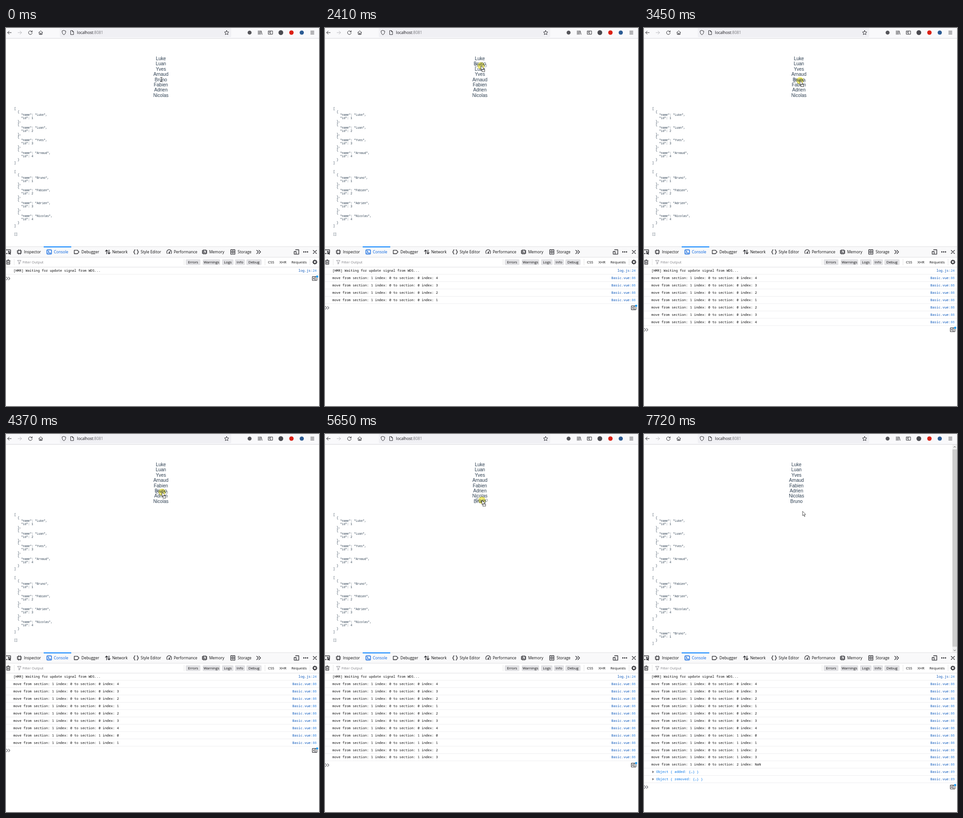
These frames come from a looping animation (681 px wide and 822 px high, 8000 ms). An HTML page:

```html
<!DOCTYPE html>
<html lang="en">
<head>
<meta charset="utf-8">
<title>Drag between lists</title>
<style>
  html, body { margin: 0; width: 100%; height: 100%; overflow: hidden; background: #fff; }
  svg { display: block; }
  text { white-space: pre; }
  .ui { font-family: "Open Sans", sans-serif; }
  .page { font: 10.1px "Liberation Sans", Arial, sans-serif; fill: #2c3e50; text-anchor: middle; }
  .json { font: 6.3px "Liberation Mono", monospace; fill: #2c3e50; }
  .log { font: 7.37px "Noto Sans Mono", monospace; fill: #0c0c0d; }
  .icon { fill: none; stroke-linecap: round; stroke-linejoin: round; }
  .halo { fill: #f8ef5c; opacity: .85; mix-blend-mode: multiply; }
</style>
</head>
<body>
<script>
const LOOP = 8000;
const INK = '#2e2e33', BLUE = '#0060df', LINE = '#e0e0e2';
const ROW = 15.93, ROW_Y = 527.6;
const NAME_Y = 66.6, NAME_STEP = 11.36;
const DRAGGED = 'Bruno';
const DROP = 7620;

function el(tag, attrs, parent, text) {
  const node = document.createElementNS('http://www.w3.org/2000/svg', tag);
  for (const key in attrs) node.setAttribute(key, attrs[key]);
  if (text !== undefined) node.textContent = text;
  if (parent) parent.append(node);
  return node;
}
const svg = el('svg', { width: 681, height: 822 }, document.body);
const group = (cls = '', parent = svg) => el('g', { class: cls }, parent);
const rect = (x, y, width, height, fill, parent = svg, rx = 0) =>
  el('rect', { x, y, width, height, fill, rx }, parent);
const label = (x, y, text, size, fill, parent = svg) =>
  el('text', { x, y, fill, 'font-size': size, class: 'ui' }, parent, text);
const icon = (x, y, d, stroke = INK, parent = svg, width = 1) =>
  el('path', { d, stroke, 'stroke-width': width, class: 'icon', transform: `translate(${x} ${y})` }, parent);
const dot = (cx, cy, r, fill, parent = svg) => el('circle', { cx, cy, r, fill }, parent);
const show = (node, on) => node.setAttribute('display', on ? 'inline' : 'none');
const place = (node, x, y) => node.setAttribute('transform', `translate(${x} ${y})`);

// Browser toolbar
function drawToolbar() {
  rect(0, 0, 681, 22, '#f9f9fb');
  rect(117, -3, 373, 23, '#f0f0f4', svg, 3);
  rect(0, 22, 681, 1, '#d8d8dc');
  icon(7.5, 10, 'M4 0H-4M-.5-3.5L-4 0L-.5 3.5');
  icon(30, 10, 'M-4 0H4M.5-3.5L4 0L.5 3.5', '#b8b8bd');
  icon(53, 10, 'M3.6-1.7A4 4 0 1 0 4 .8M4-4.2V-1.4H1.2');
  icon(75.5, 10, 'M-4.3 0L0-4L4.3 0M-3.2-.8V4H3.2V-.8M-1 4V1.2H1V4');
  icon(126, 10, 'M0-4.7L4-3.2C4 1 2.6 3.4 0 4.8C-2.6 3.4-4 1-4-3.2Z');
  icon(144, 10, 'M-3-4.3H.6L3-1.9V4.3H-3ZM.6-4.3V-1.9H3');
  icon(480, 10, 'M0-4.6L1.4-1.6L4.7-1.2L2.3 1.1L2.9 4.4L0 2.8L-2.9 4.4L-2.3 1.1L-4.7-1.2L-1.4-1.6Z');
  icon(553, 10, 'M-4-4V4M-1.6-4V4M.8-4V4M2.2-3.6L4.2 4');
  icon(575.5, 10, 'M-4.5-3.5H4.5V3.5H-4.5ZM-.3-3.5V3.5M-3-1.5H-1.8M-3 .3H-1.8');
  icon(666.5, 10, 'M-3.6-3H3.6M-3.6 0H3.6M-3.6 3H3.6');
  dot(530, 10, 4.3, '#55555a');
  dot(598, 10, 5.2, '#4a4a50');
  dot(621, 10, 4.8, '#dc1f14');
  dot(643.5, 10, 4.6, '#2b5b94');
  const url = label(154.5, 13, 'localhost', 8.45, '#15141a');
  el('tspan', { fill: '#77777d' }, url, ':8081');
}

// Developer tools panel
function drawTools() {
  rect(0, 475, 681, 347, '#fff');
  rect(0, 475, 681, 23, '#f9f9fa');
  for (const y of [475, 498, 519.5]) rect(0, y, 681, 1, LINE);
  rect(82, 475, 60, 2, '#0a84ff');

  const tabs = [
    [39, 'Inspector', 29, 'M-3.2-3.2H3.2V3.2H-3.2ZM-5-1.8H-3.2M-5 1.8H-3.2M3.2-1.8H5M3.2 1.8H5M-1.8-5V-3.2M1.8-5V-3.2M-1.8 3.2V5M1.8 3.2V5'],
    [104, 'Console', 94, 'M-4-4.5H4Q5-4.5 5-3.5V3.5Q5 4.5 4 4.5H-4Q-5 4.5-5 3.5V-3.5Q-5-4.5-4-4.5ZM-2.5-2L-.3 0L-2.5 2M.8 2.2H2.8'],
    [164, 'Debugger', 153.5, 'M-5-3.7H2L5.3 0L2 3.7H-5Z'],
    [231, 'Network', 221.5, 'M-2.6 4.3V-4M-5.2-1.5L-2.6-4.2L0-1.5M2.6-4.3V4M0 1.5L2.6 4.2L5.2 1.5'],
    [293, 'Style Editor', 283, 'M-2-4.5Q-3.8-4.5-3.8-2.8Q-3.8-.3-5.2 0Q-3.8.3-3.8 2.8Q-3.8 4.5-2 4.5M2-4.5Q3.8-4.5 3.8-2.8Q3.8-.3 5.2 0Q3.8.3 3.8 2.8Q3.8 4.5 2 4.5'],
    [365, 'Performance', 355, 'M-4 3.5A5.2 5.2 0 1 1 4 3.5M0 2.3L2.2-1.8M-1 2.3A1 1 0 1 0 1 2.3A1 1 0 1 0-1 2.3'],
    [442, 'Memory', 432, 'M-3.3-4H3.3V4H-3.3ZM-5.2-2.5H-3.5M-5.2 0H-3.5M-5.2 2.5H-3.5M3.5-2.5H5.2M3.5 0H5.2M3.5 2.5H5.2M-1-1.8V1.8H1'],
    [504, 'Storage', 493.5, 'M-4.5-4.8H4.5V4.8H-4.5ZM-4.5 0H4.5M-1.3-2.4H1.3M-1.3 2.4H1.3']
  ];
  for (const [x, name, ix, d] of tabs) {
    const on = name === 'Console';
    icon(ix, 487, d, on ? BLUE : INK, svg, 1.35);
    label(x, 490.4, name, 8.45, on ? BLUE : '#0c0c0d');
  }
  icon(5, 487, 'M-6-4.5H5V-1M-6 3.5H-2M0-1.5L5.5.6L3 1.8L5.2 4.2L4.2 5L2.2 2.7L1.2 4.5Z', INK, svg, 1.35);
  icon(549.5, 487, 'M-4-3.7L-.3 0L-4 3.7M.7-3.7L4.4 0L.7 3.7', INK, svg, 1.35);
  icon(632, 487, 'M-2-4.8H5V4.8H-.5M-5-1H-.7V4.8H-5Z', INK, svg, 1.35);
  for (const x of [648, 652, 656]) dot(x, 487, 1.4, INK);
  icon(672, 487, 'M-3.6-3.6L3.6 3.6M3.6-3.6L-3.6 3.6', INK, svg, 1.35);

  icon(5, 509, 'M-4.3-3H4.3M-1.5-3V-4.7H1.5V-3M-3.3-3V4.6H3.3V-3M-1.2-.8V2.5M1.2-.8V2.5', INK, svg, 1.2);
  icon(29, 509, 'M-3.7-3.7H3.7L1 .2V3.2L-1 4.3V.2Z', '#8a8a90', svg, .9);
  label(36, 512, 'Filter Output', 7.7, '#808086');
  for (const x of [17.5, 387, 563, 661]) rect(x, 502, .8, 14, LINE);

  const filters = [[391, 'Errors', 32], [428, 'Warnings', 38], [470, 'Logs', 25], [498, 'Info', 22],
    [523, 'Debug', 33], [569, 'CSS'], [594, 'XHR'], [620, 'Requests']];
  for (const [x, name, width] of filters) {
    if (width) rect(x, 503, width, 12.5, '#e2e2e5', svg, 2);
    const text = label(width ? x + width / 2 : x + 1, 512, name, 7.8, '#0c0c0d');
    if (width) text.setAttribute('text-anchor', 'middle');
  }
  for (let i = 0; i < 8; i++) {
    el('path', { d: 'M-1-5.3H1V-3H-1Z', fill: INK, transform: `translate(672 509) rotate(${i * 45})` }, svg);
  }
  icon(672, 509, 'M-3 0A3 3 0 1 0 3 0A3 3 0 1 0-3 0', INK, svg, 1.7);
}

// Page data
const people = names => names.map((name, i) => ({ name, id: i + 1 }));
const first = people(['Luke', 'Luan', 'Yves', 'Arnaud']);
const second = people([DRAGGED, 'Fabien', 'Adrien', 'Nicolas']);
const others = [...first, ...second.slice(1)].map(p => p.name);

function drawJson(lists) {
  const g = group('json');
  let y = 177;
  for (const list of lists) {
    const lines = JSON.stringify(list, null, 2).split('\n');
    lines.forEach((line, i) => el('text', { x: 17.8, y: y + i * 6.94 }, g, line));
    y += (lines.length - 1) * 6.94 + 18.7;
  }
  return g;
}

// [time, section, index] of each logged move
const moves = [
  [1080, 0, 4], [1225, 0, 3], [1590, 0, 2], [2240, 0, 1], [2540, 0, 2], [2890, 0, 3], [3240, 0, 4],
  [3730, 1, 0], [4240, 1, 1], [4850, 1, 2], [5505, 1, 3], [5910, 2, NaN]
];
// Place of the dragged name in the joined list
const slotOf = ([, section, index]) => section === 0 ? index : section === 1 ? 4 + index : 7;

const rows = [{ at: 0, text: '[HMR] Waiting for update signal from WDS...', file: 'log.js', line: 24 }];
for (const [at, section, index] of moves) {
  rows.push({ at, text: `move from section: 1 index: 0 to section: ${section} index: ${index}`, file: 'Basic.vue', line: 86 });
}
for (const kind of ['added', 'removed']) {
  rows.push({ at: DROP, text: `Object { ${kind}: {…} }`, file: 'Basic.vue', line: 89, object: true });
}

function drawRow(row, i) {
  const g = group('log'), y = ROW_Y + i * ROW;
  el('text', { x: row.object ? 26.5 : 16, y: y + 2.6, fill: row.object ? '#0074e8' : '#0c0c0d' }, g, row.text);
  if (row.object) el('path', { d: `M18 ${y - 2.7}L22 ${y}L18 ${y + 2.7}Z`, fill: '#77777c' }, g);
  const link = el('text', { x: 676, y: y + 2.6, fill: '#0050b8', 'text-anchor': 'end' }, g, row.file + ':');
  el('tspan', { fill: '#2a80e0' }, link, row.line);
  rect(0, y + 7.6, 681, .8, '#e9e9ec', g);
  return g;
}

drawToolbar();
const nameLayer = group('page');
const nameNodes = [...others, DRAGGED].map(name => el('text', {}, nameLayer, name));
const jsonBefore = drawJson([first, second, []]);
const jsonAfter = drawJson([first, second.slice(1), second.slice(0, 1)]);

const scrollbar = group();
rect(671, 23, 10, 452, '#f0f0f0', scrollbar);
rect(671, 33.5, 10, 429, '#cdcdcd', scrollbar);
icon(676, 28, 'M-2 1L0-1L2 1', '#505050', scrollbar);
icon(676, 470.5, 'M-2-1L0 1L2-1', '#505050', scrollbar);

drawTools();
const rowNodes = rows.map(drawRow);

const prompt = group();
icon(5, 0, 'M-4-3L-1 0L-4 3M.5-3L3.5 0L.5 3', '#707076', prompt, 1.3);
icon(671.5, 0, 'M-4.3-4.2H4.3Q5-4.2 5-3.5V3.5Q5 4.2 4.3 4.2H-4.3Q-5 4.2-5 3.5V-3.5Q-5-4.2-4.3-4.2ZM1.3-4.2V4.2M-1-1.5L-2.7 0L-1 1.5', INK, prompt, 1.2);
dot(677, -4.4, 2.3, '#1a9cf5', prompt);

const halo = el('circle', { r: 7.8, class: 'halo' }, svg);
const ghost = group('page');
el('text', { x: -.5, y: 3, opacity: .6 }, ghost, DRAGGED);
const hand = group();
const beam = icon(1, 0, 'M-2-4.5H-.6L0-4L.6-4.5H2M0-4V4M-2 4.5H-.6L0 4L.6 4.5H2', '#222', hand, .9);
const arrow = group('', hand);
el('path', { d: 'M0 0V9.6L2.2 7.6L3.9 11.5L5.4 10.9L3.8 7.1H6.8Z', fill: '#fff', stroke: '#111', 'stroke-width': .7 }, arrow);
const parcel = el('rect', { x: 2, y: 8.3, width: 6, height: 4.6, fill: '#fff', stroke: '#222', 'stroke-width': .8 }, hand);

// Pointer path: [time, x, y]
const path = [
  [0, 337, 112], [1010, 337, 111], [1400, 337, 98.5], [1670, 337, 93.5], [1870, 337.5, 92],
  [2395, 339.5, 82], [2620, 339.5, 87], [2690, 339.5, 89], [3450, 339.5, 114.5], [4040, 339.5, 121],
  [4240, 339.5, 123.5], [4370, 339.5, 126.5], [4650, 339.5, 130], [4850, 340, 131], [5300, 340.5, 134.5],
  [5440, 341, 136], [5645, 341.5, 144], [6190, 345, 162], [6390, 345.5, 163.5], [7520, 345.5, 164], [7720, 345, 168]
];
// Spans in which the picture moves: [start, end, steps]
const bursts = [
  [740, 740, 1], [1010, 1670, 10], [1870, 2620, 11], [2690, 3450, 12], [3510, 4040, 8], [4240, 4370, 3],
  [4510, 4650, 3], [4850, 5300, 8], [5440, 6190, 12], [6260, 6390, 3], [7520, 7720, 3]
];

function snap(t) {
  const burst = bursts.findLast(b => b[0] <= t);
  if (!burst) return 0;
  const [start, end, steps] = burst;
  if (t >= end) return end;
  const step = (end - start) / (steps - 1);
  return start + Math.floor((t - start) / step + 1e-6) * step;
}

function pointerAt(t) {
  const i = path.findIndex(p => p[0] > t);
  if (i < 0) return path.at(-1).slice(1);
  const a = path[i - 1], b = path[i], k = (t - a[0]) / (b[0] - a[0]);
  return [a[1] + (b[1] - a[1]) * k, a[2] + (b[2] - a[2]) * k];
}

function render(time) {
  const t = snap(time);
  const dragging = t >= 1010 && t < 7520;
  const dropped = t >= DROP;

  const last = moves.findLast(m => m[0] <= t);
  const order = [...others];
  order.splice(last ? slotOf(last) : 4, 0, DRAGGED);
  for (const node of nameNodes) {
    place(node, dropped ? 331.7 : 337, NAME_Y + 3.5 + order.indexOf(node.textContent) * NAME_STEP);
  }

  show(jsonBefore, !dropped);
  show(jsonAfter, dropped);
  show(scrollbar, dropped);

  const count = rows.filter(r => r.at <= t).length;
  rowNodes.forEach((node, i) => show(node, i < count));
  place(prompt, 0, ROW_Y + 17.2 + (count - 1) * ROW);

  const [x, y] = pointerAt(t);
  for (const node of [halo, ghost, hand]) place(node, x, y);
  show(ghost, dragging);
  show(halo, t >= 740 && t < 7520);
  show(beam, t < 1010);
  show(arrow, t >= 1010);
  show(parcel, dragging);
}

let begin;
function tick(now) {
  begin ??= now;
  render((now - begin) % LOOP);
  requestAnimationFrame(tick);
}
render(0);
requestAnimationFrame(tick);
</script>
</body>
</html>
```
